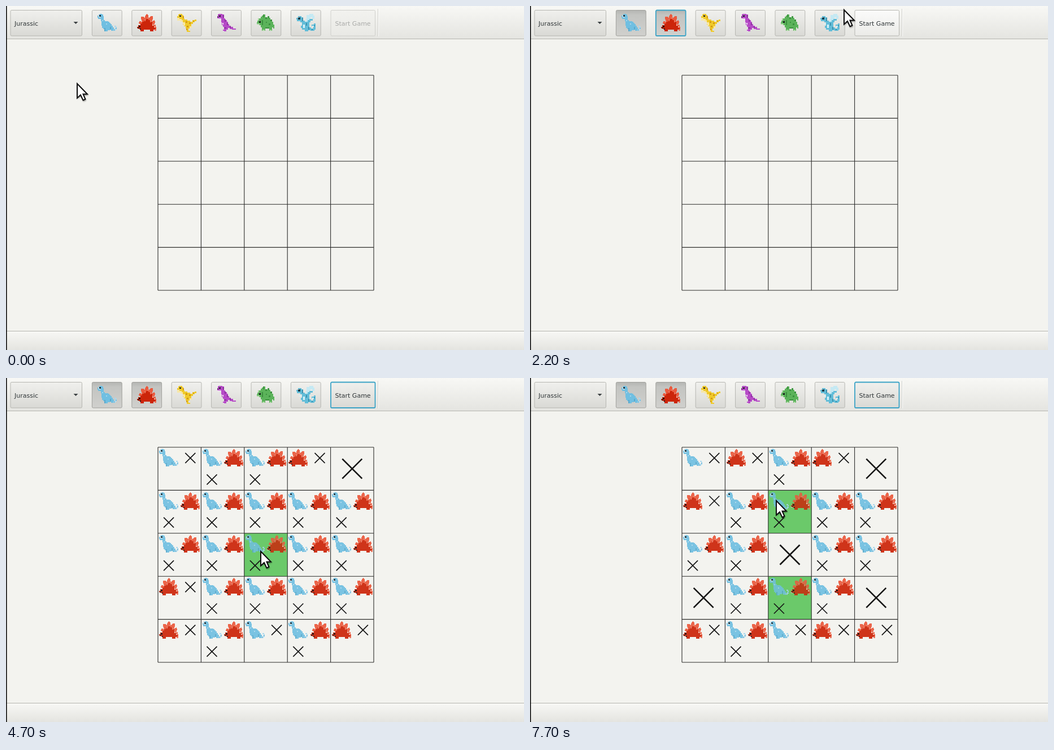
Write an HTML page that moves like this. It is 917 px wide and 611 px high and loops after 8 s.

```html
<!DOCTYPE html>
<html lang="en">
<head>
<meta charset="utf-8">
<title>Dinosaur board</title>
<style>
html, body { margin: 0; width: 100%; height: 100%; overflow: hidden; background: #f3f3ef; }
svg { display: block; }
text { font: 11px "DejaVu Sans", sans-serif; fill: #2e3436; }
.sprite { shape-rendering: crispEdges; }
.button { fill: url(#up); stroke: #b6b6b1; }
.grid { stroke: #2c2c2b; stroke-width: 1.1; fill: none; }
.cross { stroke: #141414; fill: none; }
.board .sprite { opacity: .93; }
.board .lit .sprite { opacity: .84; }

#first, #second, #start, #label, #before, #after, #cursor { animation: 8s step-end infinite; }
#first { animation-name: first; }
#second { animation-name: second; }
#start { animation-name: start; }
#label { animation-name: label; }
#before { animation-name: before; }
#after { animation-name: after; }
#cursor { animation-name: cursor; }

@keyframes first {
  0% { fill: url(#up); stroke: #b6b6b1; stroke-width: 1; }
  10% { fill: url(#hover); stroke: #b6b6b1; stroke-width: 1; }
  12.5% { fill: url(#down); stroke: #3ba3c6; stroke-width: 1.8; }
  21.25%, to { fill: url(#down); stroke: #a0a09c; stroke-width: 1; }
}
@keyframes second {
  0% { fill: url(#up); stroke: #b6b6b1; stroke-width: 1; }
  17.5% { fill: url(#hover); stroke: #b6b6b1; stroke-width: 1; }
  21.25% { fill: url(#down); stroke: #3ba3c6; stroke-width: 1.8; }
  32.5%, to { fill: url(#down); stroke: #a0a09c; stroke-width: 1; }
}
@keyframes start {
  0% { fill: url(#off); stroke: #d0d0cc; stroke-width: 1; }
  12.5% { fill: url(#up); stroke: #b6b6b1; stroke-width: 1; }
  27.5% { fill: url(#hover); stroke: #b6b6b1; stroke-width: 1; }
  32.5% { fill: url(#down); stroke: #3ba3c6; stroke-width: 1.8; }
  36.25% { fill: url(#hover); stroke: #3ba3c6; stroke-width: 1.8; }
  40%, to { fill: url(#up); stroke: #3ba3c6; stroke-width: 1.8; }
}
@keyframes label { 0% { fill: #a9aaa8; } 12.5%, to { fill: #2e3436; } }
@keyframes before { 0% { opacity: 0; } 36.25% { opacity: 1; } 75%, to { opacity: 0; } }
@keyframes after { 0% { opacity: 0; } 75%, to { opacity: 1; } }
@keyframes cursor {
  0% { transform: translate(125px, 137px); }
  5% { transform: translate(134px, 121px); }
  7.5% { transform: translate(148px, 96px); }
  8.75% { transform: translate(162px, 66px); }
  10% { transform: translate(171px, 46px); }
  11.25% { transform: translate(174px, 39px); }
  12.5% { transform: translate(175px, 37px); }
  16.25% { transform: translate(190px, 36px); }
  17.5% { transform: translate(216px, 36px); }
  18.75% { transform: translate(231px, 37px); }
  23.75% { transform: translate(250px, 35px); }
  25% { transform: translate(330px, 26px); }
  26.25% { transform: translate(450px, 13px); }
  27.5% { transform: translate(555px, 6px); }
  30% { transform: translate(596px, 24px); }
  31.25% { transform: translate(611px, 38px); }
  32.5% { transform: translate(612px, 40px); }
  42.5% { transform: translate(645px, 85px); }
  43.75% { transform: translate(697px, 155px); }
  45% { transform: translate(723px, 190px); }
  53.75% { transform: translate(712px, 194px); }
  55% { transform: translate(668px, 212px); }
  56.25% { transform: translate(588px, 249px); }
  57.5% { transform: translate(506px, 284px); }
  58.75% { transform: translate(450px, 307px); }
  60% { transform: translate(429px, 326px); }
  61.25% { transform: translate(424px, 335px); }
  63.75% { transform: translate(428px, 335px); }
  65% { transform: translate(434px, 334px); }
  66.25% { transform: translate(439px, 335px); }
  67.5% { transform: translate(442px, 336px); }
  75% { transform: translate(442px, 352px); }
  86.25% { transform: translate(441px, 335px); }
  88.75% { transform: translate(441px, 324px); }
  90% { transform: translate(440px, 300px); }
  91.25% { transform: translate(439px, 272px); }
  92.5% { transform: translate(437px, 247px); }
  93.75% { transform: translate(436px, 229px); }
  95% { transform: translate(435px, 220px); }
  96.25%, to { transform: translate(435px, 217px); }
}
</style>
</head>
<body>
<svg width="917" height="611" viewBox="0 0 917 611">
  <defs>
    <linearGradient id="bar" x2="0" y2="1"><stop stop-color="#f8f8f5"/><stop offset="1" stop-color="#e4e4e0"/></linearGradient>
    <linearGradient id="up" x2="0" y2="1"><stop stop-color="#f0f0ed"/><stop offset="1" stop-color="#d9d9d5"/></linearGradient>
    <linearGradient id="hover" x2="0" y2="1"><stop stop-color="#fbfbfa"/><stop offset="1" stop-color="#ebebe8"/></linearGradient>
    <linearGradient id="off" x2="0" y2="1"><stop stop-color="#f2f2ef"/><stop offset="1" stop-color="#e9e9e5"/></linearGradient>
    <linearGradient id="down" x2="0" y2="1"><stop stop-color="#b4b5b2"/><stop offset=".18" stop-color="#c3c4c1"/><stop offset="1" stop-color="#d0d0cd"/></linearGradient>
    <filter id="soft" x="-50%" y="-50%" width="200%" height="200%"><feGaussianBlur stdDeviation="1.3"/></filter>

    <g id="brachio" class="sprite">
      <path fill="#70bfe1" d="M2 2H4V1H8V2H10V5H11V12H13V14H19V15H21V17H23V19H25V22H27V25H29V31H24V28H22V30H18V32H12V28H10V26H8V22H7V14H6V10H1V8H0V4H2z"/>
      <path fill="#a8d8ee" d="M28 28H31V26H32V24H30V22H33V24H34V29H32V31H28zM8 12h2v2h-2zM15 18h2v2h-2z"/>
      <path fill="#58a8cc" d="M12 26h2v6h-2zM22 24h2v5h-2zM29 28h1v3h-1zM32 26h2v1h-2z"/>
      <path fill="#e8f5fa" d="M2 3h4v4h-4z"/><path fill="#18323f" d="M3 3h3v3h-3z"/>
    </g>
    <g id="stego" class="sprite">
      <path fill="#ea5a3e" d="M14 8L15 3L17 1L20 4V10L24 5H28V10L26 15L31 12L32 16L30 21L33 20L34 28H28L8 20L3 18L4 14L9 15L7 10V6H11z"/>
      <path fill="#cc250a" d="M0 24H2V21H6V18H9V15H12V12H16V10H20V12H24V15H27V18H29V22H31V26H33V29H29V32H23V29H12V32H6V28H2V27H0z"/>
      <path fill="#e9735b" d="M13 10h2v4h-2zM18 7h3v3h-3zM23 12h2v4h-2zM27 17h2v3h-2zM31 28h3v3h-3z"/>
      <path fill="#f3c1b2" d="M27 20h2v2h-2zM30 23h2v2h-2zM0 26h3v2H0z"/>
      <path fill="#241010" d="M3 22h3v3H3zM1 25h2v2H1zM5 27h2v2H5z"/>
    </g>
    <g id="raptor" class="sprite">
      <path fill="#efca2b" d="M3 1H9V3H11V9H13V11H18V13H23V15H27V12H31V11H34V14H31V16H28V19H25V23H22V27H20V31H23V33H17V27H15V23H12V20H10V13H8V10H3V8H0V5H2V2H3z"/>
      <path fill="#f7e7a8" d="M0 8H4V10H8V12H10V15H6V13H0zM10 16H14V22H11zM22 23H26V26H22z"/>
      <path fill="#d69b13" d="M10 5h2v4h-2zM15 14h3v3h-3zM21 16h3v3h-3zM28 13h2v2h-2zM17 22h3v3h-3zM16 27h2v3h-2z"/>
      <path fill="#2a250f" d="M4 3h3v3H4z"/><path fill="#fff" d="M5 3h1v1H5z"/>
    </g>
    <g id="rex" class="sprite">
      <path fill="#b64bc7" d="M3 1H10V2H13V9H15V12H18V15H20V19H22V22H25V24H29V27H34V29H27V28H23V26H20V29H17V32H11V29H13V24H11V21H9V16H8V11H3V9H1V5H2V2H3z"/>
      <path fill="#8c329e" d="M11 3h2v5h-2zM14 11h2v4h-2zM18 17h2v4h-2zM23 23h2v3h-2zM13 25h4v2h-4z"/>
      <path fill="#eedcf1" d="M3 9h5v2H3zM5 16h4v2H5zM10 17h2v3h-2zM11 31h2v1h-2z"/>
      <path fill="#1d1021" d="M4 3h3v3H4zM1 6h2v1H1z"/><path fill="#fff" d="M5 3h1v1H5z"/>
    </g>
    <g id="trike" class="sprite">
      <path fill="#5bb35a" d="M5 9H8V6H10V4H13V2H16V7H20V5H23V8H25V11H28V15H30V20H32V27H30V25H28V31H23V27H16V31H10V25H8V21H5V20H1V16H2V13H5z"/>
      <path fill="#3c913f" d="M12 2h2v5h-2zM16 7h3v3h-3zM21 5h2v4h-2zM25 11h3v3h-3zM10 12h2v9h-2zM17 15h2v2h-2zM22 18h3v3h-3zM16 25h7v2h-7z"/>
      <path fill="#a9d8a1" d="M1 18h5v2H1zM3 9h2v4H3zM11 29h4v2h-4zM24 29h3v2h-3z"/>
      <path fill="#162819" d="M5 13h3v4H5z"/><path fill="#fff" d="M6 13h1v1H6z"/>
    </g>
    <g id="drake" class="sprite">
      <path fill="#c5e9f3" d="M18 3H23V1H30V4H32V10H28V7H25V12H21V18H17z"/>
      <path fill="#62bdd8" d="M3 5H9V7H12V13H15V15H20V12H23V10H29V13H25V16H23V25H26V27H30V23H27V20H31V18H34V29H32V31H25V30H21V32H15V29H10V26H8V22H10V16H7V14H1V11H0V8H3z"/>
      <path fill="#3c91ae" d="M10 8h2v6h-2zM17 17h2v5h-2zM21 24h2v5h-2zM27 28h2v2h-2zM31 21h2v2h-2z"/>
      <path fill="#d9f1f7" d="M12 20h3v6h-3zM5 18h4v2H5zM28 22h3v2h-3z"/>
      <path fill="#163642" d="M3 7h4v4H3z"/><path fill="#fff" d="M4 7h1v1H4z"/>
    </g>
  </defs>

  <rect width="917" height="611" fill="#f3f3ef"/>
  <rect width="917" height="59" fill="url(#bar)"/>
  <rect y="577" width="917" height="34" fill="url(#bar)"/>
  <path d="M0 58.5H917M0 577.5H917" stroke="#b4b4af"/>
  <path d="M658.5 5V54" stroke="#cfcfca"/><path d="M659.5 5V54" stroke="#fff"/>
  <rect width="1.6" height="611" fill="#111"/>

  <rect class="button" x="8" y="7.5" width="126.5" height="45.5" rx="2"/>
  <text x="15" y="34.5">Jurassic</text>
  <path d="M119.5 28H127.5L123.5 32z" fill="#3b4042"/>
  <g id="tools"></g>
  <rect id="start" class="button" x="575" y="7.5" width="78.5" height="45.5" rx="2"/>
  <text id="label" x="582.5" y="34.5">Start Game</text>

  <g id="before" class="board"></g>
  <g id="after" class="board"></g>
  <path id="grid" class="grid"/>

  <g id="cursor">
    <path d="M2 3V28L8 23L12 33L17 31L13 22H21z" fill="#000" opacity=".4" filter="url(#soft)"/>
    <path d="M1 1V26.5L7 21L11.5 30.5L15.5 28.5L11.5 19.5H19z" fill="#fff" stroke="#0b0b0b" stroke-width="2"/>
  </g>
</svg>
<script>
const byId = id => document.getElementById(id);
const LEFT = 269, TOP = 123, CELL = 76.4;

const sprite = (name, x, y) => `<use href="#${name}" class="sprite" x="${x}" y="${y}"/>`;
const cross = (x, y, r, width) =>
  `<path class="cross" stroke-width="${width}" d="M${x - r} ${y - r}l${2 * r} ${2 * r}m0 ${-2 * r}l${-2 * r} ${2 * r}"/>`;

byId("tools").innerHTML = ["brachio", "stego", "raptor", "rex", "trike", "drake"].map((name, i) => {
  const x = 152.4 + 70.4 * i;
  const id = ["first", "second"][i] || name + "-button";
  return `<rect id="${id}" class="button" x="${x}" y="7.5" width="52.8" height="45.5" rx="2"/>` +
    sprite(name, Math.round(x + 9.4), 13);
}).join("");

byId("grid").setAttribute("d", [0, 1, 2, 3, 4, 5].map(i =>
  `M${LEFT + CELL * i} ${TOP}v${CELL * 5}M${LEFT} ${TOP + CELL * i}h${CELL * 5}`).join(""));

// b: blue, r: red, x: cross, *: highlighted
function drawCell(code, x, y) {
  if (code === "x") return cross(x + CELL / 2, y + CELL / 2, 17.5, 2.6);
  const lit = code.includes("*");
  const items = [...code.replace("*", "")].map((item, i) => {
    const cx = x + CELL * (i % 2 ? .75 : .25);
    const cy = y + CELL * (i > 1 ? .75 : .25);
    if (item === "x") return cross(cx, cy, 9, 1.7);
    return sprite(item === "b" ? "brachio" : "stego", Math.round(cx - 17), Math.round(cy - 17));
  }).join("");
  const fill = lit ? `<rect x="${x}" y="${y}" width="${CELL}" height="${CELL}" fill="#6bc96a"/>` : "";
  return `<g class="${lit ? "lit" : ""}">${fill}${items}</g>`;
}

function drawBoard(id, cells) {
  byId(id).innerHTML = cells.split(" ").map((code, i) =>
    drawCell(code, LEFT + CELL * (i % 5), TOP + CELL * Math.floor(i / 5))).join("");
}

drawBoard("before", "bx brx brx rx x " +
  "brx brx brx brx brx " +
  "brx brx *brx brx brx " +
  "rx brx brx brx brx " +
  "rx brx bx brx rx");
drawBoard("after", "bx rx brx rx x " +
  "rx brx *brx brx brx " +
  "brx brx x brx brx " +
  "x brx *brx brx x " +
  "rx brx bx rx rx");
</script>
</body>
</html>
```
